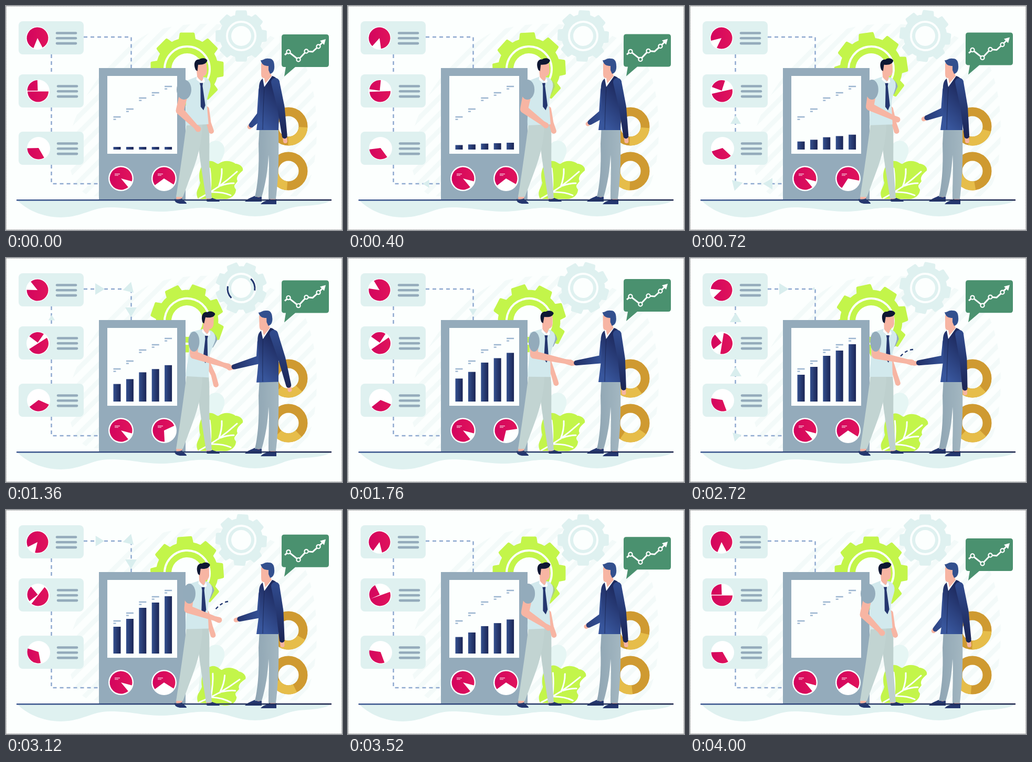
These frames come from a looping animation (640 by 426 pixels, 4.08 s). An HTML page:

```html
<!DOCTYPE html>
<html lang="en">
<head>
<meta charset="utf-8">
<title>Business handshake</title>
<style>
html, body { margin: 0; width: 100%; height: 100%; overflow: hidden; background: #fcfffe; }
svg { display: block; width: 100%; height: 100%; }
.dash { fill: none; stroke: #8ea9cf; stroke-width: 2.5; stroke-dasharray: 7 6; }
.skin { fill: #f7b5a3; }
.navy { fill: #25376f; }
.mint { fill: #dff1f0; }
.spark { fill: none; stroke: #22386f; }
</style>
</head>
<body>
<svg viewBox="0 0 640 426" xmlns="http://www.w3.org/2000/svg">
  <defs>
    <linearGradient id="red"><stop stop-color="#d3045e"/><stop offset="1" stop-color="#e0145b"/></linearGradient>
    <linearGradient id="bar"><stop stop-color="#34508e"/><stop offset="1" stop-color="#1b2555"/></linearGradient>
    <linearGradient id="coat" gradientUnits="userSpaceOnUse" x1="478" y1="215" x2="526" y2="170">
      <stop stop-color="#38569c"/><stop offset="1" stop-color="#1e2b60"/></linearGradient>
    <linearGradient id="arm" gradientUnits="userSpaceOnUse" x1="425" y1="0" x2="490" y2="0">
      <stop stop-color="#1e2b60"/><stop offset="1" stop-color="#38569c"/></linearGradient>
    <linearGradient id="sleeveFade" gradientUnits="userSpaceOnUse" x1="0" y1="145" x2="0" y2="250">
      <stop stop-color="#2f498b"/><stop offset="1" stop-color="#1b2555"/></linearGradient>
    <linearGradient id="slacks"><stop stop-color="#8fa5b3"/><stop offset="1" stop-color="#a3b7c1"/></linearGradient>
    <linearGradient id="floor" gradientUnits="userSpaceOnUse" x1="21" y1="0" x2="619" y2="0">
      <stop stop-color="#3a5690"/><stop offset="1" stop-color="#19224a"/></linearGradient>
    <pattern id="stripes" width="22" height="22" patternUnits="userSpaceOnUse" patternTransform="rotate(45)">
      <rect width="9" height="22" fill="#f3faf9"/></pattern>
  </defs>
  <rect width="640" height="426" fill="#fcfffe"/>
  <path fill="url(#stripes)" d="M120 300C105 215 190 95 275 50C360 20 500 30 560 95C605 160 600 330 560 362H160Q130 350 120 300Z"/>
  <path class="mint" d="M22 370C38 386 68 402 105 402C148 401 162 383 198 383C240 383 258 391 300 391C340 389 352 382 388 384C428 388 440 400 475 400C515 399 526 385 558 381C590 379 608 377 618 370Z"/>

  <g id="bigGear"></g>
  <g id="smallGear"></g>
  <circle id="spin" class="spark" r="26" stroke-width="3"/>

  <path fill="#e6f6f4" d="M366 345C372 310 370 275 390 259C404 251 421 262 415 282C408 306 385 315 378 345Z"/>
  <g id="leaf">
    <path fill="#c3f54a" d="M366 367C359 352 368 347 370 336C365 318 370 300 386 295C396 293 402 302 405 300C418 290 434 297 437 300C445 300 453 307 451 313C441 321 438 327 441 333C436 341 432 341 438 349C438 362 424 369 412 367Z"/>
    <path fill="none" stroke="#fcfffe" stroke-width="3" stroke-linecap="round" d="M368 366Q405 347 440 315M389 354Q391 328 388 309M405 344Q412 326 411 310M390 354Q412 353 428 360M408 342Q422 337 434 337"/>
  </g>
  <g id="donuts" fill="none" stroke-width="17"></g>

  <path class="dash" d="M148 59H238.500V118M86.500 92V130M86.500 193V239M86.500 302V338H177"/>
  <g id="cards"></g>
  <g id="arrows" fill="#d9eeee"></g>
  <path id="chev" class="spark" stroke-width="4" d="M186 81L195 90L186 99M199 81L208 90L199 99"/>

  <rect x="177" y="118" width="165" height="251" fill="#94abbb"/>
  <rect x="193" y="133" width="133" height="148" fill="#fcfffe"/>
  <g id="bars" fill="url(#bar)"></g>
  <g id="labels" stroke="#9bb5d0" stroke-width="2.4"></g>
  <g id="dials"></g>

  <g id="bubble">
    <path fill="#4a916f" d="M530 54H610Q615 54 615 59V111Q615 116 610 116H551L530 134L533 116H530Q525 116 525 111V59Q525 54 530 54Z"/>
    <path fill="none" stroke="#fff" stroke-width="3" d="M531 93L538 87L557 102L572 86L584 87L595 77L605 67"/>
    <path fill="#fff" d="M609 63L606 74L598 66Z"/>
    <g id="dots" fill="#4a916f" stroke="#fff" stroke-width="2.2"></g>
  </g>

  <path id="trail" class="spark" stroke-width="2.4" d="M427 174Q413 173 399 189"/>

  <g>
    <path class="skin" d="M475 358H486V368H475ZM502 363H513V373H502Z"/>
    <path class="navy" d="M455 372C460 366 468 364 474 361Q480 366 487 362V372ZM485 377C490 371 498 370 502 367Q508 371 515 367V377Z"/>
    <path fill="url(#slacks)" d="M483 228H519C519 270 521 310 514 367H500C500 335 502 305 500 283C499 312 494 340 487 363H474C482 330 482 290 481 262Z"/>
    <g id="guest">
      <path id="guestHand" class="skin"/>
      <path id="guestArm" fill="url(#arm)"/>
      <path class="skin" d="M486 109H504V127L507 136L494 150L492 137Q486 138 486 129Z"/>
      <path fill="#fff" d="M491 137L494 147L506 133L508 140L492 156L488 141Z"/>
      <path fill="url(#coat)" d="M489 138L492 154L507 133C516 135 521 143 522 160L519 236H477C481 205 484 190 482 165C481 150 483 142 489 138Z"/>
      <path fill="none" stroke="#182450" stroke-width=".8" d="M492 154Q490 190 489 235"/>
      <path id="swingHand" class="skin"/>
      <path id="swingArm" fill="url(#sleeveFade)"/>
      <path fill="#33508e" d="M485 103C490 104 492 99 500 100C508 99 511 106 511 113C512 121 509 128 503 129L500 122V114C493 114 487 112 485 103Z"/>
    </g>
  </g>

  <g>
    <path class="skin" d="M325 358H336L335 368H324ZM381 362H391L392 370H382Z"/>
    <path class="navy" d="M321 367Q329 369 335 366C338 371 344 372 344 376H331Q320 374 321 367ZM383 367Q389 368 393 365C398 368 407 368 407 372H384Q380 371 383 367Z"/>
    <path fill="#bed0ce" d="M360 222H386C389 255 386 280 388 312L392 366H381C376 330 370 300 366 262Z"/>
    <path fill="#c2d4d2" d="M344 222H374C374 255 366 285 356 312L337 363H324C331 318 338 270 344 222Z"/>
    <path id="farArm" class="skin"/>
    <g id="torso">
      <path id="farSleeve" fill="#93abbb" d="M387 140Q396 143 398 154L391 168L384 172Z"/>
      <path fill="#d2e9ed" d="M346 142L371 134L386 137Q396 143 394 155C391 167 385 176 385 190L386 226H342C342 206 347 190 345 168Z"/>
      <path class="skin" d="M369 112L389 110L389 126Q387 134 382 134L379 144L370 137Z"/>
      <path fill="#fff" d="M369 134L377 145L383 138L384 145L378 149L368 140Z"/>
      <path class="navy" d="M374 147L380 147L379 153L382 190L378 199L373 192L375 153Z"/>
      <path fill="#0e1733" d="M368 122C363 109 368 101 376 102C382 98 390 101 391 105C389 111 383 113 373 112L371 124Z"/>
    </g>
    <path id="nearArm" class="skin"/>
    <ellipse id="sleeve" cy="159" ry="19" fill="#93abbb"/>
  </g>

  <path stroke="url(#floor)" stroke-width="2.5" stroke-linecap="round" d="M21 369.200L619 369"/>
  <rect x=".5" y=".5" width="639" height="425" fill="none" stroke="#999" stroke-dasharray="2 1"/>
</svg>
<script>
const LOOP = 4080, STEP = 80;
const $ = id => document.getElementById(id);
const set = (el, attrs) => { for (const k in attrs) el.setAttribute(k, attrs[k]); };
const add = (parent, tag, attrs) => {
  const el = document.createElementNS('http://www.w3.org/2000/svg', tag);
  set(el, attrs);
  return parent.appendChild(el);
};
const show = (el, on) => set(el, { visibility: on ? 'visible' : 'hidden' });
const clamp = x => Math.max(0, Math.min(1, x));
const ease = x => { x = clamp(x); return x * x * (3 - 2 * x); };
const mix = (p, q, u) => [p[0] + (q[0] - p[0]) * u, p[1] + (q[1] - p[1]) * u];
const polar = (cx, cy, r, deg) => {
  const a = deg * Math.PI / 180;
  return [cx + r * Math.cos(a), cy + r * Math.sin(a)];
};

// Eases from 0 to 1 over a..b and back over c..d.
const hold = (t, a, b, c, d) => ease((t - a) / (b - a)) - ease((t - c) / (d - c));
// Single soft pulse around a moment.
const pulse = (t, mid, half) => Math.cos(Math.min(1, Math.abs(t - mid) / half) * Math.PI / 2) ** 2;

const arc = (cx, cy, r, a, b) =>
  `${polar(cx, cy, r, a)}A${r} ${r} 0 ${b - a > 180 ? 1 : 0} 1 ${polar(cx, cy, r, b)}`;
const wedge = (cx, cy, r, a, b) => `M${cx} ${cy}L${arc(cx, cy, r, a, b)}Z`;
const disc = (x, y, r) => `M${x - r} ${y}a${r} ${r} 0 1 0 ${2 * r} 0a${r} ${r} 0 1 0 ${-2 * r} 0Z`;

// Tapered limb through points [x, y, radius].
function limb(...pts) {
  let d = '';
  pts.forEach((p, i) => {
    d += disc(...p);
    if (!i) return;
    const q = pts[i - 1], dx = p[0] - q[0], dy = p[1] - q[1], l = Math.hypot(dx, dy) || 1;
    const side = (c, s) => [c[0] - s * dy / l * c[2], c[1] + s * dx / l * c[2]];
    d += `M${side(q, 1)}L${side(p, 1)}L${side(p, -1)}L${side(q, -1)}Z`;
  });
  return d;
}

function gear(g, inner, outer, ring, hole, color) {
  const pts = [];
  for (let c = -90; c < 270; c += 45)
    pts.push(polar(0, 0, inner, c - 14), polar(0, 0, outer, c - 10),
      polar(0, 0, outer, c + 10), polar(0, 0, inner, c + 14), polar(0, 0, inner, c + 22.5));
  add(g, 'path', { d: `M${pts.join('L')}Z`, fill: color, stroke: color, 'stroke-width': 5, 'stroke-linejoin': 'round' });
  add(g, 'circle', { r: ring, fill: 'none', stroke: '#fcfffe', 'stroke-width': 4 });
  add(g, 'circle', { r: hole, fill: '#fcfffe' });
}
gear($('bigGear'), 57, 68, 43, 30, '#c3f54a');
gear($('smallGear'), 39, 47, 27, 19, '#dff1f0');

const pie = (g, x, y, r) => {
  add(g, 'circle', { cx: x, cy: y, r, fill: '#fff' });
  return add(g, 'path', { fill: 'url(#red)' });
};
const pies = [29, 130, 239].map((top, n) => {
  const g = $('cards');
  add(g, 'rect', { x: 24, y: top, width: 124, height: 63, rx: 8, class: 'mint' });
  for (let i = 0; i < 3; i++)
    add(g, 'path', { d: `M${n ? 99 : 97} ${top + 22.5 + i * 9.8}h36`, stroke: '#94abbb', 'stroke-width': 4.6, 'stroke-linecap': 'round' });
  return pie(g, 60 + n, top + 32, 22);
});
const dials = [219, 301].map(x => {
  const p = pie($('dials'), x, 328, 24);
  add($('dials'), 'path', { d: `M${x - 12} 319.5h10m-10 2.6h7`, stroke: '#f3b9cd', 'stroke-width': 1.4 });
  return p;
});
set(dials[0], { d: wedge(219, 328, 21.5, 50, 375) });

const HEIGHTS = [51, 66, 87, 97, 109];
const bars = HEIGHTS.map((h, i) => {
  const x = 204.5 + i * 24.4;
  add($('labels'), 'path', { d: `M${x} ${262 - h}h14m-14 4.6h5` });
  return add($('bars'), 'rect', { x, width: 14 });
});
[[538, 87], [557, 102], [572, 86], [595, 77]].forEach(([cx, cy]) => add($('dots'), 'circle', { cx, cy, r: 3.6 }));

const rings = [229, 314].map(cy => {
  add($('donuts'), 'circle', { cx: 538, cy, r: 28, stroke: '#cf9a31' });
  return add($('donuts'), 'path', { stroke: '#e6bd4a' });
});

// Flow markers along the dashed line: x, y, heading
const FLOW = [[149, 338, 180], [87, 338, 225], [87, 217, 270], [87, 114, 270], [178, 59, 0], [236, 59, 45], [238, 102, 90]];
const arrows = FLOW.map(() => add($('arrows'), 'path', { d: 'M10 0L-8 11V-11Z' }));

function drawCharts(t) {
  const grow = hold(t, 0, 2350, 3160, 3960);
  bars.forEach((bar, i) => {
    const h = t < 3960 ? 5 + (HEIGHTS[i] - 5) * grow : 0;
    set(bar, { y: 273 - h, height: h });
  });

  const gap = 62 + 127 * hold(t, 0, 1600, 1700, 4000);
  set(pies[0], { d: wedge(60, 61, 20.5, gap + 50, gap + 360) });

  const half = -33 * hold(t, 200, 1400, 2400, 4000) - 57 * hold(t, 1700, 2300, 2400, 4000);
  const slice = 180 + 37 * hold(t, 0, 1360, 1700, 2300) - 38 * hold(t, 1700, 2300, 3200, 4000);
  set(pies[1], { d: wedge(61, 162.5, 20, half, half + 180) + wedge(60.5, 161, 20, slice, slice + 88) });

  const tilt = 60 - 38 * hold(t, 0, 1560, 1700, 2500) + 19 * pulse(t, 3120, 800);
  set(pies[2], { d: wedge(62, 270, 21.5, tilt, tilt + 119) });

  const turn = 32 - 57 * pulse(t, 1360, 1100);
  set(dials[1], { d: wedge(301, 328, 21.5, turn + 112, turn + 360) });

  const rise = hold(t, 200, 1800, 2300, 4000);
  set($('bubble'), { transform: `translate(0 ${-14 * rise})` });
  [3 + 50 * rise, 95 - 60 * rise].forEach((a, i) =>
    set(rings[i], { d: 'M' + arc(538, 229 + 85 * i, 28, a, a + 88) }));
}

function drawAccents(t) {
  arrows.forEach((el, i) => {
    const scale = Math.max(...[0, 1680].map(start => {
      const age = t - start - 260 - i * 140;
      return Math.min(ease(age / 220), ease((800 - age) / 220));
    }));
    const [x, y, a] = FLOW[i];
    set(el, { transform: `translate(${x} ${y}) rotate(${a}) scale(${scale})` });
  });

  const flash = clamp((t - 1040) / 640), len = 24 * Math.sin(flash * Math.PI);
  show($('spin'), flash > 0 && flash < 1);
  set($('spin'), {
    'stroke-dasharray': `${len} ${26 * Math.PI - len}`,
    transform: `translate(448 58) rotate(${-45 + (t - 1360) * 0.2})`
  });

  show($('chev'), t >= 2080 && t < 2640);

  const age = Math.max(0, t - 2320), count = Math.min(3, 1 + Math.floor(age / 160));
  show($('trail'), t >= 2320 && t < 3520);
  set($('trail'), { 'stroke-dasharray': `0 ${age / 200} ${'6 5 '.repeat(count)} 0 200` });
}

function drawPeople(t, nod) {
  const reach = hold(t, 0, 1440, 2600, 4000);

  // Host, on the left
  set($('torso'), { transform: `rotate(${3.5 * (reach - 1 + nod)} 364 228)` });
  set($('farSleeve'), { opacity: clamp(reach * 2) });
  const farX = 391 + 5 * reach + 4 * nod;
  set($('farArm'), { d: limb([382, 196, 5], [farX - 5, 222, 4.5], [farX, 238 + 3 * nod, 5]) });
  const shoulder = 339 + 15 * reach + 4 * nod;
  const elbow = [331 + 23 * reach + 4 * nod, 199 - 15 * reach];
  const hand = [366 + 58 * reach, 234 - 36 * reach + 8 * nod];
  set($('nearArm'), { d: limb([shoulder, 166, 8], [...elbow, 7.5], [...mix(elbow, hand, 0.85), 4.5], [...hand, 5.5]) });
  set($('sleeve'), { cx: shoulder, rx: 14 - 3.5 * reach });

  // Guest, on the right
  set($('guest'), { transform: `rotate(${-1.8 * nod} 500 236)` });
  const bend = [486, 207 - 15 * reach], grip = [464 - 38 * reach, 230 - 30 * reach + 7 * nod];
  set($('guestHand'), { d: limb([...bend, 4], [...grip, 4.2]) });
  set($('guestArm'), { d: limb([489, 160, 8], [...bend, 8], [...mix(bend, grip, 0.85), 4.8]) });
  const drop = [532 - 8 * reach + 16 * nod, 257 - 5 * nod], joint = [522 + (drop[0] - 528) * 0.4, 192];
  set($('swingHand'), { d: limb([...joint, 4], [...drop, 4]) });
  set($('swingArm'), { d: limb([513, 145, 8], [...joint, 7], [...mix(joint, drop, 0.85), 5]) });
}

function draw(t) {
  const nod = pulse(t, 1360, 500);
  const spin = -17 * hold(t, 0, 1500, 2300, 3500) - 9 * nod;
  set($('bigGear'), { transform: `translate(345 120) rotate(${spin})` });
  set($('smallGear'), { transform: `translate(448 57) rotate(${-0.9 * spin})` });
  set($('leaf'), { transform: `rotate(${6 * pulse(t, 3120, 700)} 372 366)` });
  drawCharts(t);
  drawAccents(t);
  drawPeople(t, nod);
}

function tick() {
  draw(Math.floor(performance.now() % LOOP / STEP) * STEP);
  requestAnimationFrame(tick);
}
tick();
</script>
</body>
</html>
```
